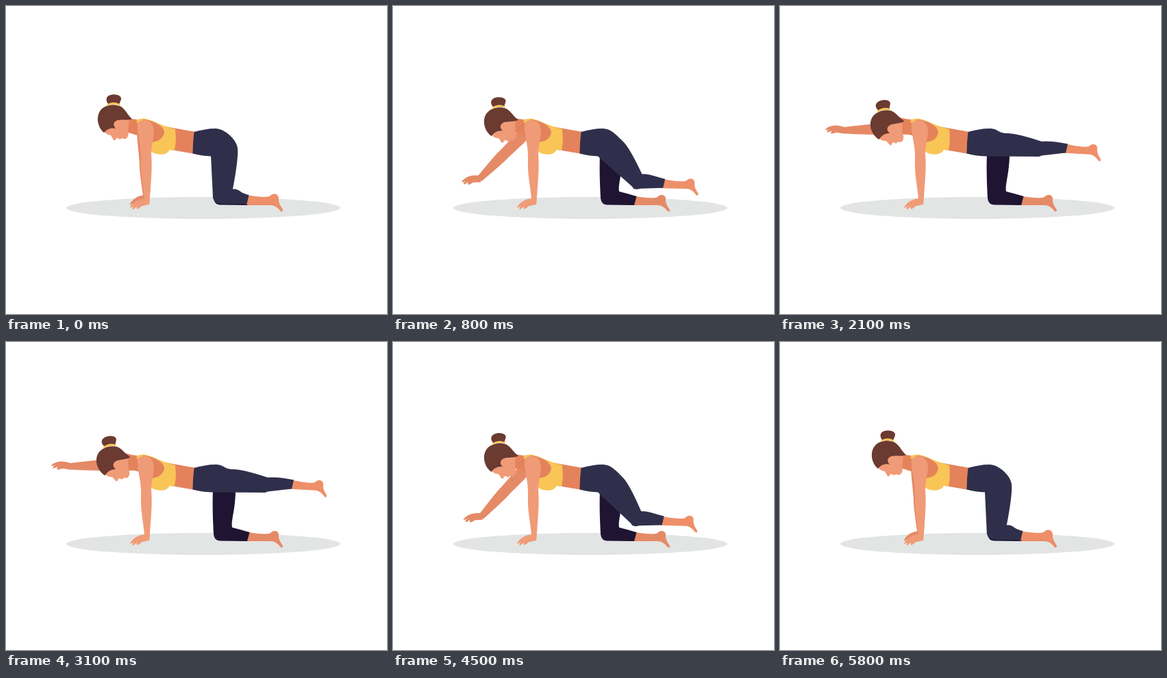
These frames come from a looping animation (556x450 px, 6 s). An HTML page with a canvas:

```html
<!DOCTYPE html>
<html lang="en">
<head>
<meta charset="utf-8">
<title>Bird dog exercise</title>
<style>
html, body { margin: 0; width: 100%; height: 100%; overflow: hidden; background: #fff; }
canvas { display: block; }
</style>
</head>
<body>
<canvas id="stage" width="556" height="450"></canvas>
<script>
const ctx = document.getElementById('stage').getContext('2d');
const LOOP = 6000, STEP = 100;
const RAD = Math.PI / 180;
const COLOR = {
  mat: '#e2e5e4', skin: '#f09b77', shade: '#e4835b', farSkin: '#e58a66', nearFoot: '#ee8f69',
  hair: '#6b3a31', yellow: '#f9c557', pants: '#302f4b', farPants: '#1f1532'
};

const lerp = (a, b, k) => a + (b - a) * k;
const hump = k => 4 * k * (1 - k);
const ease = (t, start, length) => {
  const k = Math.min(1, Math.max(0, (t - start) / length));
  return (1 - Math.cos(Math.PI * k)) / 2;
};
const lift = t => ease(t, -40, 1700) - ease(t, 3560, 1810);

function fill(color, path) {
  ctx.fillStyle = color;
  ctx.fill(new Path2D(path));
}

function placed(x, y, degrees, draw) {
  ctx.save();
  ctx.translate(x, y);
  ctx.rotate(degrees * RAD);
  draw();
  ctx.restore();
}

function hand(x, y, degrees, color) {
  placed(x, y, degrees, () => fill(color,
    'M2-5 C-5-6-11-6-15-4.5 C-20-3-24 0-26 3 Q-25 4.5-20 1.5 Q-24 5-23 6.5 Q-21 7-16 3 Q-18 6-16 7.5 Q-13 7-9 4.5 L2 4.5Z'));
}

function foot(x, y, degrees, color) {
  placed(x, y, degrees, () => fill(color,
    'M0-6 C12-4 23-3 30-4 C33-5 34-8 38-8 Q43-8 44-3 C43 4 47 9 50 14 Q50 17 47 16 C43 11 39 7 32 7 L-4 7Z'));
}

function farArm(p) {
  const angle = lerp(-3, 88, p) + 3 * hump(p);
  const length = lerp(103, 108, p);
  const wrist = [200 - length * Math.sin(angle * RAD), 178 + length * Math.cos(angle * RAD)];
  placed(200, 178, angle, () => fill(COLOR.farSkin,
    `M-9 0 C-10 25-7 40-8 60 Q-7 80-4.5 ${length} L4.5 ${length} Q7 80 8 60 C8 40 10 25 9 0Z`));
  hand(...wrist, lerp(-14, 10, p), COLOR.farSkin);
}

function farLeg() {
  foot(354, 284, 0, COLOR.farSkin);
  fill(COLOR.farPants,
    'M302 215 C301 240 302 260 303 281 Q304 290 312 290.5 L352 291 L355.5 278 Q342 274 330 271 C328 260 335 245 335 215Z');
}

function head(p) {
  placed(175, 178 + 4.5 * p, -10 * p, () => {
    ctx.translate(-175, -178);
    fill(COLOR.skin,
      'M143 183 Q146 188 153 189 L157 196 Q160 197 161 193 L164 193 Q165 196 168 194 L170 193 Q174 196 177 192 Q180 187 178 182 L180 166 L160 166Z');
    fill(COLOR.hair,
      'M143 185 C134 178 130 161 139 151 C147 143 160 143 168 147 C175 152 178 160 184 165 C177 168 169 165 162 167 C156 170 156 174 160 179 C154 177 147 180 143 185Z');
    fill(COLOR.hair,
      'M149 143 C144 136 147 130.5 155 129.5 C164 128.5 171 133 167 139 L165 144Z');
    fill(COLOR.yellow, 'M147.5 143.5 Q157 138 166.5 143.5 L166 146 Q157 141 148 146Z');
  });
}

function torso() {
  fill(COLOR.shade, 'M232 176 L277 184 L275 216 L240 210Z');
  fill(COLOR.yellow,
    'M190 168 C195 163 204 164 214 168 C225 173 235 177 247 180 Q249 196 246 211 L239 210 C235 218 222 219 212 213 L205 190Z');
  fill(COLOR.shade, 'M200 165.5 C216 168 229 174 231 184 C230 194 221 199 211 199 L200 185Z');
}

function nearLeg(p) {
  const a = lerp(6, 90, p) * RAD;
  const sin = Math.sin(a), cos = Math.cos(a);
  const thigh = 75 - hump(p);
  const kx = 303 + thigh * sin, ky = 205 + thigh * cos;
  const bulge = 9 + 6 * p;
  const front = [kx - bulge * cos, ky + bulge * sin];
  const back = [kx + 4 + 16 * (1 - p) ** 3, ky - lerp(12, 7, p)];
  const hip = [lerp(338, 332, p), lerp(208, 186, p)];
  const ax = kx + lerp(42.5, 41, p) - 3 * hump(p), ay = ky + 3 + hump(p);

  foot(ax, ay, 3 * p, COLOR.nearFoot);
  fill(COLOR.pants, `M274.5 184 C285 181 295 179 306 179
    C318 179 ${hip[0] - 14 * sin} ${hip[1] - 14 * cos} ${hip}
    Q${hip[0] + 14 * sin} ${hip[1] + 14 * cos} ${back}
    C${back[0] + 10} ${back[1] - 1} ${ax - 14} ${ay - 10} ${ax + 1} ${ay - 6.5}
    L${ax - 2} ${ay + 6.5}
    L${kx + 4} ${ky + 9.5 + 4 * p}
    Q${front[0] + 2 * cos} ${front[1] + 8 * cos} ${front}
    L299 219.5 Q284 219 272.5 215.5 Q272.5 199 274.5 184Z`);
}

function nearArm() {
  hand(206, 286, -12, COLOR.skin);
  fill(COLOR.skin,
    'M192 177 C191 169 197 166 204 167 C212 168 216 175 216 184 C215 195 212 205 212 216 C214 238 211 260 209.5 288 Q208 291 202 290 L202 281 C200 260 196 245 197 225 C198 205 192 190 192 177Z');
}

function draw(t) {
  const p = lift(t);
  ctx.fillStyle = '#fff';
  ctx.fillRect(0, 0, 556, 450);
  ctx.fillStyle = COLOR.mat;
  ctx.beginPath();
  ctx.ellipse(288, 295, 200, 16, 0, 0, 2 * Math.PI);
  ctx.fill();
  farArm(p);
  fill(COLOR.shade, 'M172 162 L184 165 L200 167 L200 191 Q187 188 176 184Z');
  head(p);
  farLeg();
  torso();
  nearLeg(p);
  nearArm();
}

const begin = performance.now();
function tick() {
  const t = (performance.now() - begin) % LOOP;
  draw(Math.floor(t / STEP) * STEP);
  requestAnimationFrame(tick);
}
tick();
</script>
</body>
</html>
```
